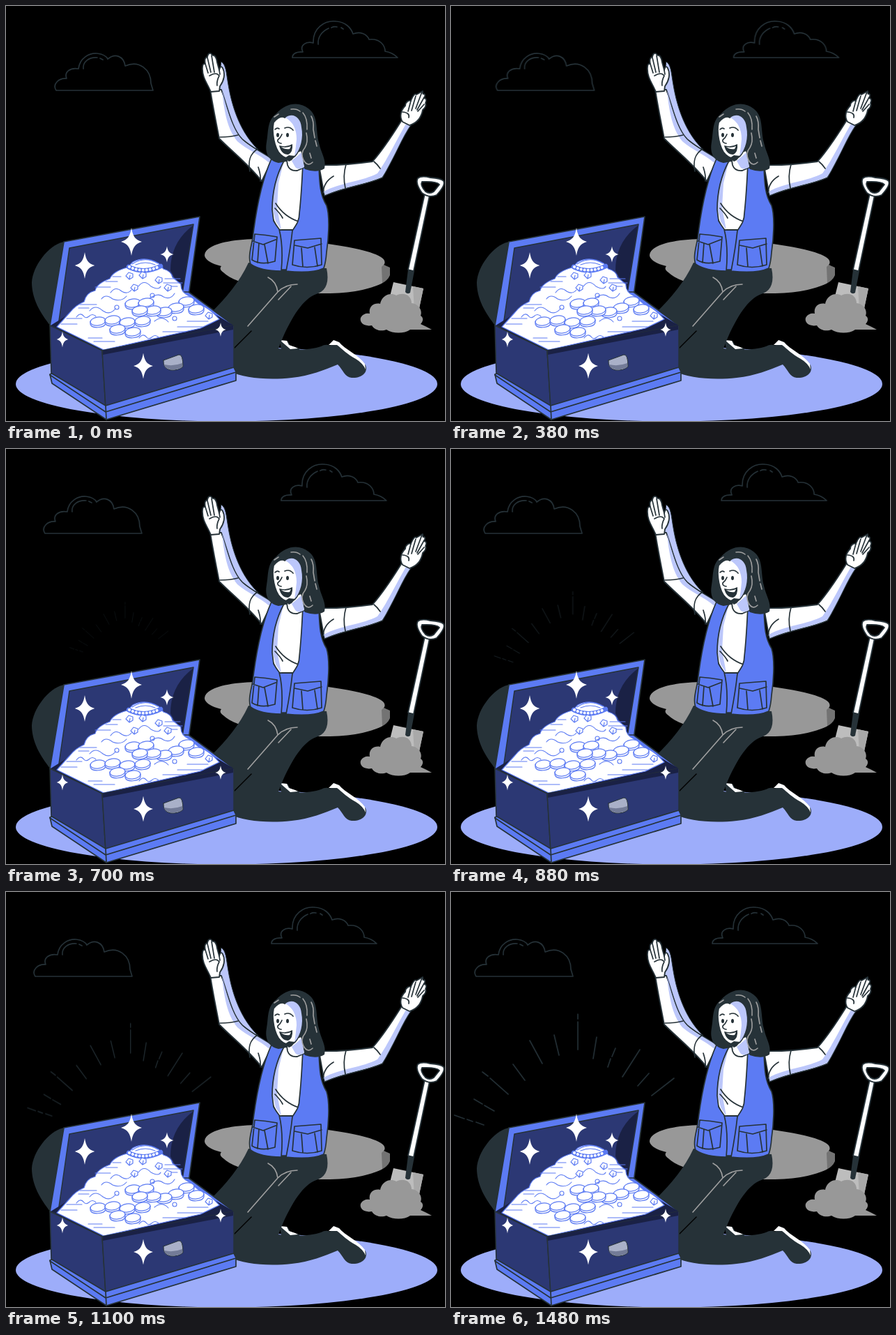
An HTML page for the animation above (1500 ms loop, 630 by 595 pixels).

```html
<!DOCTYPE html>
<html lang="en">
<head>
<meta charset="utf-8">
<title>Treasure</title>
<style>
  html, body { margin: 0; width: 100%; height: 100%; overflow: hidden; background: #000; }
  svg { display: block; width: 630px; height: 595px;
    --ink: #263238; --blue: #5c7bf3; --pale: #bcc7fb; --navy: #2c3874; --deep: #1a2145; --grey: #989898; }
  path, ellipse, circle { stroke-linecap: round; stroke-linejoin: round; }
  .line { fill: none; stroke: var(--ink); stroke-width: 1.7; }
  .skin { fill: #fff; stroke: var(--ink); stroke-width: 1.8; }
  .blue { fill: var(--blue); stroke: var(--ink); stroke-width: 1.7; }
  .navy { fill: var(--navy); stroke: var(--ink); stroke-width: 1.5; }
  .ink { fill: var(--ink); }
  .pale { fill: var(--pale); }
  .grey { fill: var(--grey); }
  .deep { fill: var(--deep); }
  .strand { fill: none; stroke: #a0a0a0; stroke-width: 1.6; }
  .gold { fill: #fff; stroke: var(--blue); stroke-width: 1.2; }
  .curl { fill: none; stroke: var(--blue); stroke-width: 1.1; }
  .clouds { animation: drift 1.5s cubic-bezier(.364, 0, .636, 1) infinite; }
  .rays { transform-origin: 162px 256px; animation: burst 1.5s cubic-bezier(.364, 0, .636, 1) infinite; }
  @keyframes drift { to { transform: translateX(-36px); } }
  @keyframes burst { from { transform: scale(0); opacity: 0; } to { transform: scale(1); opacity: 1; } }
</style>
</head>
<body>
<svg viewBox="0 0 630 595">
  <defs>
    <path id="star" d="M0-20C2-8 5-3 15 0C5 3 2 8 0 20C-2 8-5 3-15 0C-5-3-2-8 0-20Z" fill="#fff"/>
    <g id="coin" class="gold">
      <path d="M-11 0V4C-9 11 9 10 11 3V-1"/>
      <ellipse rx="11" ry="6" transform="rotate(-8)"/>
    </g>
    <path id="gem" class="gold" d="M-5 0L-1-5L5-3L5 2L0 5ZM1-1L0 5"/>
    <path id="wave" class="curl" d="M-14 2Q-9-5-4 0Q-1 5 4 1Q9-4 14 1"/>
  </defs>

  <ellipse cx="316.500" cy="542" rx="302.500" ry="53.500" fill="#9dadfa"/>

  <g class="clouds line">
    <path d="M411 74C411 68 418 65 426 66C421 56 431 50 441 53C440 32 457 20 474 22C487 23 495 31 498 40C508 36 518 40 521 48C537 46 544 57 544 65C551 66 557 69 562 74Z"/>
    <path d="M448 55C447 44 454 36 463 32M467 31Q471 29 475 30M481 31L484 33"/>
    <path d="M72 121C66 112 76 103 87 104C83 94 93 88 104 90C106 74 120 67 131 68C139 69 144 72 146 76C157 67 169 72 171 86C191 77 208 91 208 111L211 121Z"/>
    <path d="M111 90C110 80 119 73 131 74M135 75L139 77"/>
  </g>

  <g class="rays">
    <path class="line" d="M182 175V182M182 186V226M148 205L155 234M113 213L131 246M89 247L106 270M45 258L53 264M56 267L82 290M33 297L45 304M48 306L62 314M5 320L19 325M23 326L31 329M36 330L47 334M209 208L204 239M236 224L231 236M229 239L225 251M271 226L246 265M284 260L268 278M320 267L288 292"/>
  </g>

  <!-- pit -->
  <path fill="#737373" d="M536 368L551 375V386Q547 397 528 402Z"/>
  <path class="grey" d="M285 357C286 343 318 334 365 334C425 335 485 342 522 353C537 358 546 363 543 370L539 374L540 397C522 407 490 413 450 412C395 412 330 400 312 382Q305 377 309 373C296 370 285 364 285 357Z"/>

  <!-- shovel -->
  <path fill="#bdbdbd" d="M556 396L599 405L592 438L548 428Z"/>
  <path fill="#a9a9a9" d="M584 402L599 405L592 438L586 436Z"/>
  <path class="ink" d="M577 378L586 380L580 411Q576 414 573 410Z"/>
  <path class="skin" d="M601 269L608 271L585 380L577 378Z"/>
  <path class="skin" fill-rule="evenodd" d="M591 247Q596 243 609 246Q625 247 628 251Q631 257 618 271Q607 276 597 268Q587 254 591 247ZM597 252Q594 257 602 266Q608 270 614 266L622 256Q618 251 597 252Z"/>
  <path class="grey" d="M525 458C514 460 507 454 509 447C512 441 518 440 522 441C520 431 528 425 537 427C539 415 551 410 560 415C571 409 582 415 582 426C592 427 598 436 595 444C601 448 597 454 595 456Q604 460 611 464L580 464C572 470 555 470 546 464C539 467 529 465 525 458Z"/>

  <!-- legs -->
  <path class="ink" d="M393 479L404 480L409 488L421 491V500H396Z"/>
  <path fill="#fff" d="M393 479L403 480L406 486L415 489L419 491L408 492Z"/>
  <path class="ink" d="M348 368L460 376C464 395 460 407 448 412C430 417 414 438 397 476L391 491C410 494 440 493 452 488Q459 484 465 487L471 479L478 482C490 495 508 503 516 515C520 525 511 534 496 533C486 532 484 522 476 514C456 522 437 530 410 533C375 537 340 533 322 524V462L294 440C316 418 335 396 348 368Z"/>
  <path fill="none" stroke="#000" stroke-width="1.500" d="M328 490L352 466"/>
  <path fill="#fff" d="M463 486L470 479L478 482C486 492 507 501 515 513L516 521Q512 512 502 506C490 500 482 491 475 486Z"/>
  <path class="strand" d="M376 389Q388 395 390 410M418 399Q401 399 390 410L347 459M409 402L391 421"/>

  <!-- raised arm, left -->
  <path class="pale" stroke="var(--ink)" d="M309 80C316 84 316 96 319 113C325 149 338 182 360 204L338 205L304 125Z"/>
  <path class="skin" d="M293 119C296 140 302 169 306 190C328 212 347 226 367 251L382 220C366 209 353 203 339 191C324 176 318 145 309 120Z"/>
  <path class="pale" d="M310 122C317 146 324 177 340 193C353 204 367 210 380 219L378 225C363 212 347 207 332 194C317 176 313 149 310 122Z"/>
  <path class="skin" d="M294 123C289 111 281 102 282 88Q282 82 286 83Q284 74 289 73Q290 67 294 68Q297 72 299 71Q302 74 303 81L306 92Q308 84 311 89C315 97 313 107 307 115L306 122Z"/>
  <path class="line" d="M286 83L290 96M289 74L294 95M295 71L299 95M292 100Q302 94 306 100Q302 108 303 114M306 92L307 98"/>
  <path class="line" d="M361 205C350 212 347 222 350 237M307 188Q322 188 333 185M362 231Q366 243 365 251"/>

  <!-- raised arm, right -->
  <path class="skin" d="M449 228C475 229 504 226 526 223C543 204 557 181 569 162L582 169C567 190 557 218 540 246C518 256 488 259 457 272Z"/>
  <path class="pale" d="M581 170C567 190 557 218 540 245C518 255 488 258 458 271L456 266C480 253 513 251 533 240C548 219 560 193 574 169Z"/>
  <path class="line" d="M488 227Q483 244 487 261M528 223Q533 227 537 233M470 244Q456 252 455 268"/>
  <path class="skin" d="M569 166C564 158 567 149 573 143C574 136 579 135 581 136Q586 124 589 127L598 122Q598 127 599 126Q603 126 600 132Q605 133 602 139Q604 144 598 149C596 160 589 168 579 171Z"/>
  <path class="line" d="M581 136L577 151M588 129L582 150M597 123L588 147M600 131L590 149M600 141L591 151M569 152Q580 153 578 160"/>

  <!-- torso -->
  <path class="blue" d="M385 312H425L421 378H385Z"/>
  <path class="skin" d="M391 219L429 226L426 305L416 321H390L379 296Z"/>
  <path class="pale" d="M399 221L390 237L384 265L382 289L387 309L395 321L389 289L391 254Z"/>
  <path class="line" d="M387 283Q399 302 420 309M386 290Q394 298 397 304"/>
  <path class="blue" d="M381 219L399 222C385 248 382 272 382 292L384 308Q388 315 392 320C397 340 397 359 395 380C378 380 361 377 351 370C347 360 352 344 354 333C359 291 367 250 381 219Z"/>
  <path class="blue" d="M426 225L449 229C450 252 450 270 460 286C465 301 463 333 460 353Q459 367 456 376Q439 384 402 380C406 359 409 341 411 322C417 313 421 308 421 297C424 270 425 247 426 225Z"/>
  <path class="line" d="M357 327Q372 328 389 331L386 366Q366 372 353 364ZM354 337L369 342L387 335M363 340L361 368M371 342L376 369M414 336L452 333L453 371Q432 378 411 371ZM414 343L433 347L453 341M424 347L426 374M443 346L447 373"/>

  <!-- head -->
  <path class="ink" d="M388 154C401 139 421 136 434 147C449 158 444 178 449 196C452 211 460 220 457 233Q446 240 429 234L419 220L391 225C377 222 371 211 374 195C377 180 374 165 388 154Z"/>
  <path class="skin" d="M402 215L404 228Q407 237 418 236L429 231L424 207Z"/>
  <path class="pale" d="M410 222L424 210L428 231Q418 237 414 229Z"/>
  <path class="skin" d="M384 167Q393 156 400 160C411 152 423 159 424 174C427 188 423 206 415 215Q405 223 394 213C385 204 381 181 384 167Z"/>
  <path class="pale" d="M401 160C411 152 423 159 424 174C427 188 423 206 414 215Q416 203 417 191Q417 169 401 160Z"/>
  <path class="ink" d="M400 218L406 214L415 215L410 221L406 223Z"/>
  <path class="ink" d="M392 200Q402 203 411 198Q412 210 405 213Q395 213 392 200Z"/>
  <path fill="#fff" d="M395 202Q402 204 409 201L407 205Q400 206 395 202Z"/>
  <path class="line" d="M386 177Q389 174 392 176M400 175Q407 172 412 178M396 184Q394 189 390 192Q389 196 395 197"/>
  <ellipse class="ink" cx="390" cy="185" rx="2" ry="3"/>
  <ellipse class="ink" cx="404" cy="185" rx="2" ry="3"/>
  <path class="strand" d="M385 159L391 155M409 148Q417 147 422 151M426 153Q433 161 432 177M438 158Q442 165 441 177L443 189M444 193L446 201M431 182Q434 195 429 203Q422 211 427 221Q433 231 440 224M436 211L438 218"/>

  <!-- chest lid -->
  <path class="ink" d="M83 338C60 343 38 374 37 396C37 420 49 440 64 459L79 390Z"/>
  <path class="blue" d="M83 338L278 302L262 416L74 466L63 458Z"/>
  <path class="navy" d="M91 347L269 313L253 412L75 458Z"/>
  <path class="deep" d="M268 315Q236 339 236 379L253 409Z"/>
  <path class="blue" d="M252 410H262L327 458L306 465Z"/>

  <!-- chest body -->
  <path class="deep" d="M64 458L138 494L327 458L276 428L90 442Z"/>
  <path class="gold" d="M73 460L92 439Q100 429 112 424Q115 411 128 408Q130 398 149 391Q154 380 174 375L182 367Q200 358 219 369L226 377Q237 380 239 389L251 399Q250 410 263 416L279 429Q291 432 306 449L279 462L140 493Z"/>
  <g class="curl">
    <path d="M106 428H130M104 433H119M128 403H150M143 395H160M153 388H165M228 391H250M226 397H253M232 402H246M87 448H109M79 456H102M260 452H290M246 460H282M225 467H258M126 481H156M118 476H138"/>
    <path d="M150 411Q157 401 166 409Q174 414 180 407M190 402Q198 391 208 402Q219 408 222 402M137 420Q143 412 153 420Q165 425 173 416M205 420Q218 410 226 417Q236 422 242 412"/>
    <path d="M120 437Q128 427 139 437Q149 444 157 434M213 452Q224 443 233 453"/>
    <circle cx="210" cy="415" r="3"/><circle cx="159" cy="432" r="3"/><circle cx="242" cy="448" r="3"/>
    <path d="M176 374Q198 385 222 373" stroke-width="6.500"/>
    <path d="M177 374Q198 384 221 373" stroke="#fff" stroke-width="4" stroke-dasharray=".1 5"/>
    <path d="M181 370Q199 358 218 369M186 371Q200 365 214 371"/>
  </g>
  <use href="#wave" x="115" y="444"/><use href="#wave" x="205" y="474"/>
  <use href="#gem" x="177" y="387"/><use href="#gem" x="196" y="386"/><use href="#gem" x="219" y="393"/>
  <use href="#gem" x="184" y="404"/><use href="#gem" x="232" y="404"/><use href="#gem" x="291" y="444"/>
  <use href="#coin" x="259" y="423"/><use href="#coin" x="244" y="432"/><use href="#coin" x="273" y="434"/>
  <use href="#coin" x="182" y="426"/><use href="#coin" x="201" y="425"/><use href="#coin" x="227" y="438"/>
  <use href="#coin" x="211" y="436"/><use href="#coin" x="192" y="436"/><use href="#coin" x="132" y="452"/>
  <use href="#coin" x="153" y="450"/><use href="#coin" x="174" y="453"/><use href="#coin" x="196" y="451"/>
  <use href="#coin" x="160" y="463"/><use href="#coin" x="182" y="467"/>

  <path class="navy" d="M63 458L138 494L143 576L65 529Z"/>
  <path class="navy" d="M138 494L327 458V520L143 576Z"/>
  <path class="deep" d="M139 494L326 458V464L139 500Z"/>
  <path class="blue" d="M63 528L66 527L143 573L327 518L330 524V537L144 593L66 541Z"/>
  <path class="line" d="M63 529L143 582L330 525M143 573L144 593"/>
  <path fill="#a9b0c8" stroke="var(--ink)" d="M226 508L248 500Q254 499 254 517Q248 523 236 522Q225 520 226 508Z"/>
  <path fill="#737b97" d="M227 514Q240 517 253 512V517Q248 522 236 521Q227 519 227 514Z"/>

  <use href="#star" x="180" y="338"/>
  <use href="#star" transform="translate(113 372) scale(.95)"/>
  <use href="#star" transform="translate(231 356) scale(.64 .58)"/>
  <use href="#star" transform="translate(81 478) scale(.55 .57)"/>
  <use href="#star" transform="translate(197 516) scale(.93)"/>
  <use href="#star" transform="translate(308 464) scale(.52 .5)"/>
</svg>
</body>
</html>
```
